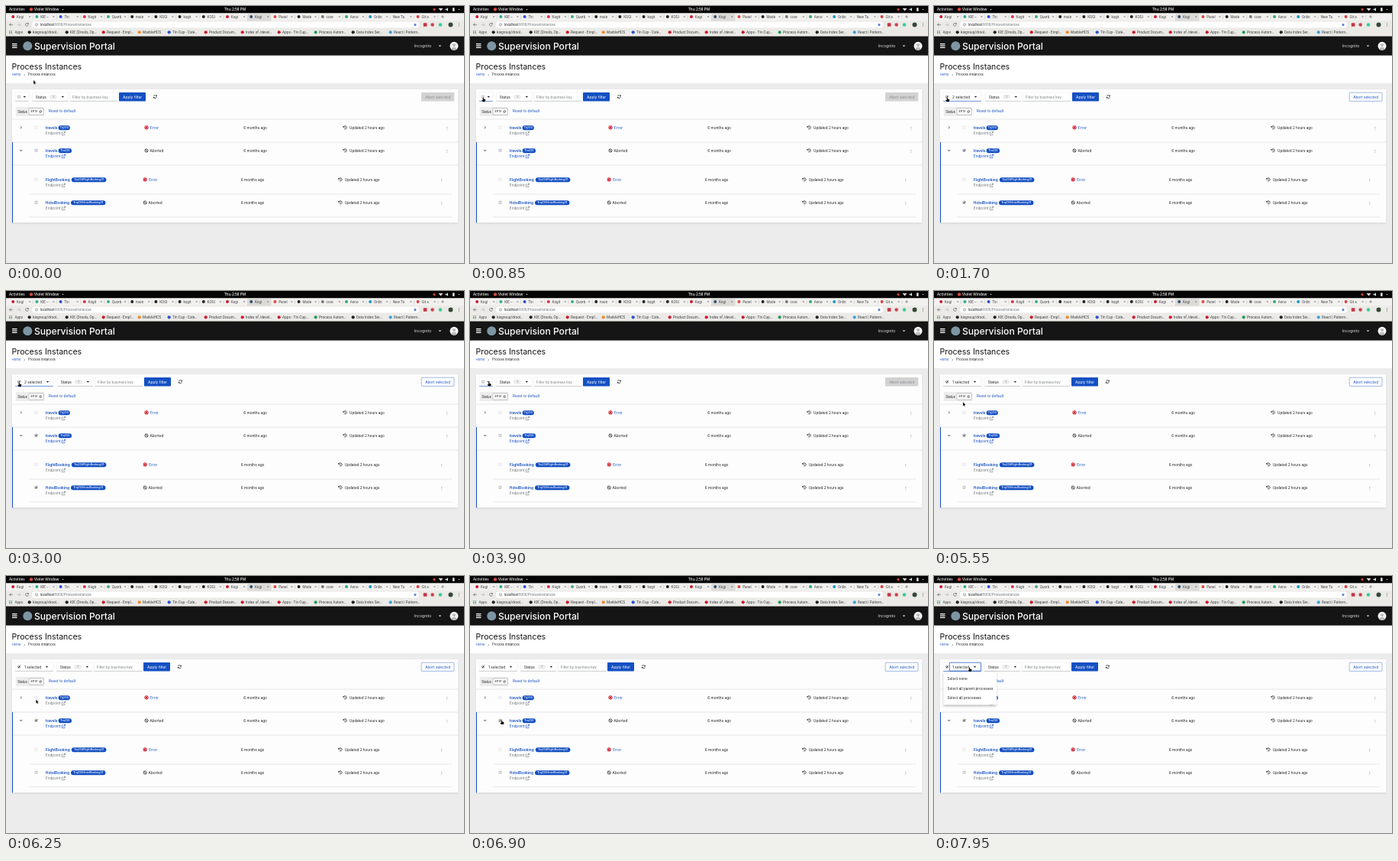
These frames come from a looping animation (600 by 336 pixels, 8 s). An HTML page with a canvas:

```html
<!DOCTYPE html>
<html lang="en">
<head>
<meta charset="utf-8">
<title>Process Instances</title>
<style>
html, body { margin: 0; width: 100%; height: 100%; overflow: hidden; background: #ececec; }
canvas { display: block; width: 600px; height: 336px; }
</style>
</head>
<body>
<canvas id="stage"></canvas>
<script>
const LOOP = 8000, STEP = 50;
const UI = 'Inter, sans-serif', SYS = '"Open Sans", sans-serif', TABS = 'Roboto, sans-serif';
const BLUE = '#1450c2', INK = '#1c1c1c', GREY = '#6a6e73', RED = '#cf1a2c', CHROME = '#ebeae7';

const canvas = document.getElementById('stage');
const dpr = window.devicePixelRatio || 1;
canvas.width = 600 * dpr;
canvas.height = 336 * dpr;
const ctx = canvas.getContext('2d');

// ---- drawing helpers ----
function rect(x, y, w, h, fill) {
  ctx.fillStyle = fill;
  ctx.fillRect(x, y, w, h);
}
function box(x, y, w, h, r, fill, stroke, lw = 0.5) {
  ctx.beginPath();
  ctx.roundRect(x, y, w, h, r);
  if (fill) { ctx.fillStyle = fill; ctx.fill(); }
  if (stroke) { ctx.strokeStyle = stroke; ctx.lineWidth = lw; ctx.stroke(); }
}
function dot(x, y, r, fill) {
  ctx.beginPath();
  ctx.arc(x, y, r, 0, 7);
  ctx.fillStyle = fill;
  ctx.fill();
}
function arc(x, y, r, color, lw, from = 0, to = Math.PI * 2) {
  ctx.beginPath();
  ctx.arc(x, y, r, from, to);
  ctx.strokeStyle = color;
  ctx.lineWidth = lw;
  ctx.stroke();
}
function line(color, lw, ...pts) {
  ctx.beginPath();
  for (let i = 0; i < pts.length; i += 2) ctx.lineTo(pts[i], pts[i + 1]);
  ctx.strokeStyle = color;
  ctx.lineWidth = lw;
  ctx.stroke();
}
function poly(fill, ...pts) {
  ctx.beginPath();
  for (let i = 0; i < pts.length; i += 2) ctx.lineTo(pts[i], pts[i + 1]);
  ctx.closePath();
  ctx.fillStyle = fill;
  ctx.fill();
}
// Type is set large and scaled down so that tiny sizes keep true advances.
function text(str, x, y, size, color = INK, weight = 400, font = UI, align = 'left') {
  const k = 8;
  ctx.save();
  ctx.translate(x, y);
  ctx.scale(1 / k, 1 / k);
  ctx.font = `${weight} ${size * k}px ${font}`;
  ctx.textAlign = align;
  ctx.fillStyle = color;
  ctx.fillText(str, 0, 0);
  ctx.restore();
}
function caret(x, y, color = INK, s = 1.8) {
  poly(color, x - s, y - s / 2, x + s, y - s / 2, x, y + s / 2);
}
function cross(x, y, s, color, lw) {
  line(color, lw, x - s, y - s, x + s, y + s);
  line(color, lw, x + s, y - s, x - s, y + s);
}
function kebab(x, y, color, gap = 1.6, r = 0.45) {
  for (let i = -1; i < 2; i++) dot(x, y + i * gap, r, color);
}

// ---- desktop and browser ----
const TAB_LIST = [
  ['Kogi', RED], ['KIE –', '#2fae8c'], ['Tin', '#2b50d8'], ['Kogit', '#d8304a'], ['Quorb', '#3fae85'],
  ['main', '#222'], ['KOGI', '#222'], ['kogit', '#222'], ['KOGI', '#222'], ['Kogi', RED],
  ['Kogi', '#2d5068'], ['Panel', '#e5483c'], ['Mode', '#222'], ['core', '#777'], ['Anno', '#2fae6c'],
  ['Onlin', '#1697c4'], ['New Ta', null], ['Git a', '#dc4040']
];
const BOOKMARKS = [
  ['kiegroup/drool…', 35, '#222'], ['KIE (Drools, Op…', 84, '#222'], ['Request - Empl…', 132, RED],
  ['MarbleHCS', 179, '#ef8a2c'], ['Tin Cup - Cale…', 218, '#2b50d8'], ['Product Docum…', 266, RED],
  ['Index of /devel…', 314, RED], ['Apps - Tin Cup…', 362, RED], ['Process Autom…', 410, '#1f9d58'],
  ['Data Index Ser…', 459, '#222'], ['React | Pattern…', 508, '#3fa0d8']
];

function drawDesktop() {
  rect(0, 0, 600, 9.5, '#050505');
  text('Activities', 4, 6.2, 4.7, '#e8e8e8', 600, SYS);
  dot(33, 4.4, 2.2, '#d9473f');
  text('Violet Window', 37, 6.2, 4.7, '#e8e8e8', 600, SYS);
  caret(74.5, 4.7, '#ccc', 1.3);
  text('Thu 2:58 PM', 300, 6.2, 4.8, '#eee', 600, SYS, 'center');
  dot(561, 4.5, 1.5, '#e34b32');
  poly('#ddd', 566.5, 3, 572.5, 3, 569.5, 6.6);
  poly('#ddd', 575.5, 3.8, 577, 3.8, 579, 2.2, 579, 6.8, 577, 5.2, 575.5, 5.2);
  rect(585, 2.4, 2.6, 4.4, '#ddd');
  caret(593.5, 4.7, '#ccc', 1.3);
}

function drawBrowser() {
  rect(0, 9.5, 600, 10, '#f2f1ef');
  TAB_LIST.forEach(([name, color], i) => {
    const x = 5 + 31.2 * i;
    if (i === 10) box(x - 1, 10, 31.5, 10, [2, 2, 0, 0], '#dcdbd8');
    else if (i !== 9) line('#b5b4b0', 0.4, x + 30.4, 12, x + 30.4, 17);
    if (color) dot(x + 4.2, 14, 2, color);
    text(name, color ? x + 9 : x + 2.5, 15.6, 4.6, '#44474b', 400, TABS);
    cross(x + 26.2, 14, 1, '#5f6368', 0.5);
  });
  line('#5f6368', 0.6, 570, 14, 574, 14);
  line('#5f6368', 0.6, 572, 12, 572, 16);

  rect(0, 19.3, 600, 20.5, CHROME);
  line('#5f6368', 0.7, 8.8, 24.4, 4.5, 24.4);
  line('#5f6368', 0.7, 6.5, 22.4, 4.5, 24.4, 6.5, 26.4);
  line('#b4b7bb', 0.7, 14.8, 24.4, 19, 24.4);
  line('#b4b7bb', 0.7, 17, 22.4, 19, 24.4, 17, 26.4);
  arc(27.5, 24.4, 1.9, '#5f6368', 0.7, 0.3, 5.5);
  poly('#5f6368', 29.7, 22, 29.7, 24.1, 27.6, 24.1);
  box(34, 20.5, 507, 8, 4, '#fff');
  arc(40, 24.4, 1.7, '#5f6368', 0.5);
  line('#5f6368', 0.5, 40, 24.1, 40, 25.5);
  text('localhost', 45, 26, 4.5, '#202124', 400, TABS);
  text(':9000/ProcessInstances', 63, 26, 4.5, '#73777c', 400, TABS);
  const star = [];
  for (let i = 0; i < 10; i++) {
    const r = i % 2 ? 1 : 2.5, a = i * Math.PI / 5 - Math.PI / 2;
    star.push(536 + r * Math.cos(a), 24.5 + r * Math.sin(a));
  }
  poly('#3674e0', ...star);
  box(546.8, 22.2, 4.6, 4.6, 0.6, '#c93440');
  dot(558.7, 24.5, 2.3, '#d0434c');
  dot(569, 24.5, 2.3, '#35cf95');
  dot(582.5, 24.5, 3, '#344a38');
  kebab(593.5, 24.5, '#5f6368', 1.7, 0.5);

  for (let i = 0; i < 9; i++) {
    rect(4 + i % 3 * 1.5, 32.3 + Math.floor(i / 3) * 1.5, 1, 1, ['#d45445', '#4b9e62', '#4d7fd8'][i % 3]);
  }
  text('Apps', 11.5, 36, 4.6, '#3c4043', 400, TABS);
  BOOKMARKS.forEach(([name, x, color]) => {
    dot(x - 4.3, 34.3, 2.1, color);
    text(name, x, 36, 4.75, '#3c4043', 400, TABS);
  });
}

function drawHeader() {
  rect(0, 39.6, 600, 25.2, '#151515');
  for (let i = 0; i < 3; i++) rect(8, 49 + i * 2.4, 6.5, 1.2, '#fff');
  dot(28.3, 52.3, 6, '#7d95a3');
  text('Supervision Portal', 37, 56.6, 12.1, '#fff', 500);
  text('Incognito', 534.5, 54, 5.2, '#ddd');
  caret(568.5, 52.4, '#eee');
  dot(587, 52.3, 5.5, '#f4f4f4');
  ctx.save();
  ctx.beginPath();
  ctx.arc(587, 52.3, 5.2, 0, 7);
  ctx.clip();
  dot(587, 51, 2.1, '#b9bcc0');
  dot(587, 58, 4.2, '#b9bcc0');
  ctx.restore();

  rect(0, 64.8, 600, 36.2, '#fff');
  text('Process Instances', 7.6, 83, 10.6, '#151515');
  text('Home', 7.8, 91.4, 4.1, BLUE);
  line(GREY, 0.5, 23.6, 88.6, 25, 90, 23.6, 91.4);
  text('Process instances', 29, 91.4, 4.15, INK);
}

// ---- page content ----
function checkbox(x, y, on, faint) {
  const s = 3.4;
  const fill = on ? '#e6e8ea' : faint ? '#f7f7f7' : '#e4e4e4';
  const edge = on ? '#777' : faint ? '#d2d2d2' : '#969696';
  box(x - s / 2, y - s / 2, s, s, 0.5, fill, edge, 0.4);
  if (on) line('#111', 0.9, x - 1.1, y, x - 0.2, y + 1, x + 1.2, y - 1.1);
}
function field(x, w, bottom = '#8a8d90', lw = 0.4) {
  box(x, 113, w, 11.3, 0, '#fff', '#ededed', 0.5);
  line(bottom, lw, x, 124.4, x + w, 124.4);
}

function drawToolbar(s) {
  const dx = [0, 32, 33][s.count];
  const wide = s.count > 0;
  const w = wide ? 49.5 : 17.5;
  field(12.2, w, s.hover ? BLUE : '#8a8d90', s.hover ? 0.6 : 0.4);
  checkbox(17, 118.7, wide, false);
  if (wide) text(s.count + ' selected', 24, 120.6, 4.7);
  caret(wide ? 21.5 + dx : 24.3, 118.9);
  if (s.open) box(20.3, 113.2, w - 8.3, 11, 0.3, null, BLUE, 0.7);

  field(34.5 + dx, 46.5);
  text('Status', 38.8 + dx, 120.6, 4.7);
  box(57 + dx, 115.8, 9.8, 6, 3, '#ececec');
  text('1', 62 + dx, 120.1, 3.6, GREY, 400, UI, 'center');
  caret(74.3 + dx, 118.9);
  field(83.5 + dx, 62.5);
  text('Filter by business key', 86.8 + dx, 120.6, 4.6, '#7b7f84');
  box(148 + dx, 113, 35, 11.5, 0.8, BLUE);
  text('Apply filter', 165.6 + dx, 120.6, 4.85, '#fff', 400, UI, 'center');
  const rx = 195.3 + dx, ry = 118.6;
  arc(rx, ry, 2, INK, 0.7, 3.4, 5.9);
  arc(rx, ry, 2, INK, 0.7, 0.25, 2.75);
  poly(INK, rx + 2.5, ry - 2.4, rx + 2.5, ry - 0.4, rx + 0.5, ry - 0.4);
  poly(INK, rx - 2.5, ry + 2.4, rx - 2.5, ry + 0.4, rx - 0.5, ry + 0.4);

  if (wide) box(544.2, 113.2, 42.8, 11.2, 0.8, '#fff', BLUE, 0.4);
  else box(544, 113, 43.2, 11.5, 0.8, '#d2d2d2');
  text('Abort selected', 565.6, 120.6, 4.75, wide ? BLUE : '#858a90', 400, UI, 'center');

  box(12.8, 132, 37.4, 12, 0.8, '#ededed');
  text('Status', 15.2, 139.6, 4.2);
  box(30, 133.9, 19.2, 8.2, 0.8, '#fff', '#8a8d90', 0.5);
  text('Error', 32.5, 139.3, 3.8);
  arc(45.2, 138, 1.5, '#4a4d50', 0.6);
  cross(45.2, 138, 0.7, '#4a4d50', 0.5);
  text('Reset to default', 56, 138.8, 4.75, BLUE);
}

function endpoint(y, color) {
  text('Endpoint', 51.8, y + 9.3, 4.75, color);
  line(color, 0.6, 75.2, y + 6, 73.2, y + 6, 73.2, y + 9.7, 76.9, y + 9.7, 76.9, y + 7.7);
  line(color, 0.6, 74.7, y + 8.2, 77.6, y + 5.3);
  poly(color, 75.8, y + 4.9, 78, y + 4.9, 78, y + 7.1);
}
function drawRow(y, r) {
  const dx = r.child ? -1.8 : 0, far = r.child ? -6.2 : 0;
  checkbox(39.5, y - 0.2, r.on, r.error);
  text(r.name, 51.8, y + 1.8, 4.8, BLUE, 600);
  box(r.pill[0], y - 2.8, r.pill[1], 6, 3, BLUE);
  text(r.id, r.pill[0] + r.pill[1] / 2, y + 1.4, r.child ? 3.55 : 3.5, '#fff', 500, UI, 'center');
  endpoint(y, r.link ? BLUE : '#73777b');

  const ix = 184 + dx;
  if (r.error) {
    dot(ix, y - 0.2, 2.6, RED);
    dot(ix, y - 0.2, 1.8, '#f7d9dc');
    dot(ix, y - 0.2, 1.25, RED);
    text('Error', 189 + dx, y + 1.8, 4.75, BLUE);
  } else {
    arc(ix, y, 2.1, INK, 0.75);
    line(INK, 0.75, ix - 1.5, y - 1.5, ix + 1.5, y + 1.5);
    text('Aborted', 188.4 + dx, y + 1.8, 4.75);
  }
  text('6 months ago', r.child ? 307.7 : 311.2, y + 1.8, 4.75);
  const hx = 444.3 + far;
  arc(hx, y - 0.2, 2.1, INK, 0.65, -2.8, 2.4);
  poly(INK, hx - 2.8, y - 2.3, hx - 0.7, y - 0.4, hx - 2.8, y - 0.2);
  line(INK, 0.55, hx, y - 1.4, hx, y, hx + 0.9, y + 0.5);
  text('Updated 2 hours ago', 450 + far, y + 1.8, 4.6);
  kebab(577.8 + (r.child ? -7 : 0), y + 0.8, GREY);
}

function drawList(s) {
  const rule = (x, y, w) => rect(x, y, w, 0.6, '#d8d8d8');
  rule(8, 147.7, 584);
  rule(8, 177.7, 584);
  rule(8, 207.7, 584);
  rule(30, 245.7, 554);
  rule(30, 275.6, 554);
  rect(8, 178, 1, 105.3, BLUE);
  line(INK, 0.7, 19, 157.4, 20.4, 158.9, 19, 160.4);
  line(INK, 0.8, 18, 188.4, 19.7, 189.4, 21.4, 188.4);
  drawRow(159, { name: 'travels', id: 'Trj234', pill: [68.6, 15.2], error: true });
  drawRow(189, { name: 'travels', id: 'Tra234', pill: [68.6, 17.4], on: s.count > 0, link: true });
  drawRow(227, { name: 'FlightBooking', id: 'Trq234FlightBooking01', pill: [85.8, 45.6], error: true, child: true });
  drawRow(257, { name: 'HotelBooking', id: 'Trq234HotelBooking01', pill: [85, 45.4], on: s.count === 2, child: true });
}

function drawMenu(y) {
  ctx.save();
  ctx.shadowColor = 'rgba(0,0,0,.3)';
  ctx.shadowBlur = 3 * dpr;
  ctx.shadowOffsetY = dpr;
  rect(12.3, 126, 70, 42.5, '#fff');
  ctx.restore();
  ['Select none', 'Select all parent processes', 'Select all processes'].forEach((item, i) => {
    const top = 128.3 + i * 12.4;
    if (y >= top && y < top + 12.4) rect(12.3, top, 70, 12.4, '#ebebeb');
    text(item, 17.6, top + 8, 4.68);
  });
}

function drawPointer(x, y, hand) {
  ctx.save();
  ctx.translate(x, y);
  ctx.lineJoin = 'round';
  ctx.beginPath();
  const pts = hand
    ? [-0.6, 0, 0.5, 0, 0.6, 1.8, 2.9, 2.4, 2.9, 4.2, 2.2, 5.6, -0.7, 5.6, -2, 3.6, -1.7, 2.9, -0.6, 3.6]
    : [0, 0, 0, 5, 1.1, 4, 1.9, 5.7, 2.7, 5.3, 1.9, 3.7, 3.4, 3.5];
  for (let i = 0; i < pts.length; i += 2) ctx.lineTo(pts[i], pts[i + 1]);
  ctx.closePath();
  ctx.strokeStyle = 'rgba(255,255,255,.9)';
  ctx.lineWidth = 0.9;
  ctx.stroke();
  ctx.fillStyle = '#111';
  ctx.fill();
  ctx.restore();
}

// ---- timeline ----
const PATH = [
  [0, 36, 97], [200, 36, 97], [850, 17.3, 119.6], [3500, 17.3, 119.6], [3950, 25, 119], [4350, 25, 119],
  [4750, 36, 135.5], [4900, 36, 135.5], [5200, 38, 145.3], [6000, 38, 145.3],
  [6600, 41.5, 188.5], [7000, 41.5, 188.5], [7600, 46.5, 119.5], [LOOP, 46.5, 119.5]
];
const CLICKS = [
  [0, 0, false], [1050, 2, false], [3400, 0, false], [4200, 0, true], [5300, 1, false], [7800, 1, true]
];

function pointerAt(t) {
  const i = Math.max(1, PATH.findIndex(p => p[0] > t));
  const [t0, x0, y0] = PATH[i - 1], [t1, x1, y1] = PATH[i];
  const u = (t - t0) / (t1 - t0), e = u * u * (3 - 2 * u);
  return [x0 + (x1 - x0) * e, y0 + (y1 - y0) * e];
}
function stateAt(t) {
  const [, count, open] = CLICKS.filter(c => c[0] <= t).pop();
  const [x, y] = pointerAt(t);
  const hover = y > 113 && y < 124.5 && x > 12 && x < (count ? 62 : 30);
  const inMenu = open && y > 126 && y < 168 && x < 82;
  const onBox = Math.abs(x - 40) < 3 && Math.abs(y - 188.5) < 3;
  return { count, open, x, y, hover, hand: hover || inMenu || onBox };
}

function draw(t) {
  const s = stateAt(t);
  ctx.setTransform(dpr, 0, 0, dpr, 0, 0);
  rect(0, 0, 600, 336, '#ececec');
  drawDesktop();
  drawBrowser();
  drawHeader();
  ctx.save();
  ctx.shadowColor = 'rgba(0,0,0,.18)';
  ctx.shadowBlur = 2 * dpr;
  ctx.shadowOffsetY = 0.6 * dpr;
  rect(7.7, 109, 584.6, 174.3, '#fdfdfd');
  ctx.restore();
  drawToolbar(s);
  drawList(s);
  if (s.open) drawMenu(s.y);
  drawPointer(s.x, s.y, s.hand);
}

let last = -1;
function tick() {
  const t = Math.floor(performance.now() % LOOP / STEP) * STEP;
  if (t !== last) draw(last = t);
  requestAnimationFrame(tick);
}
tick();
</script>
</body>
</html>
```
